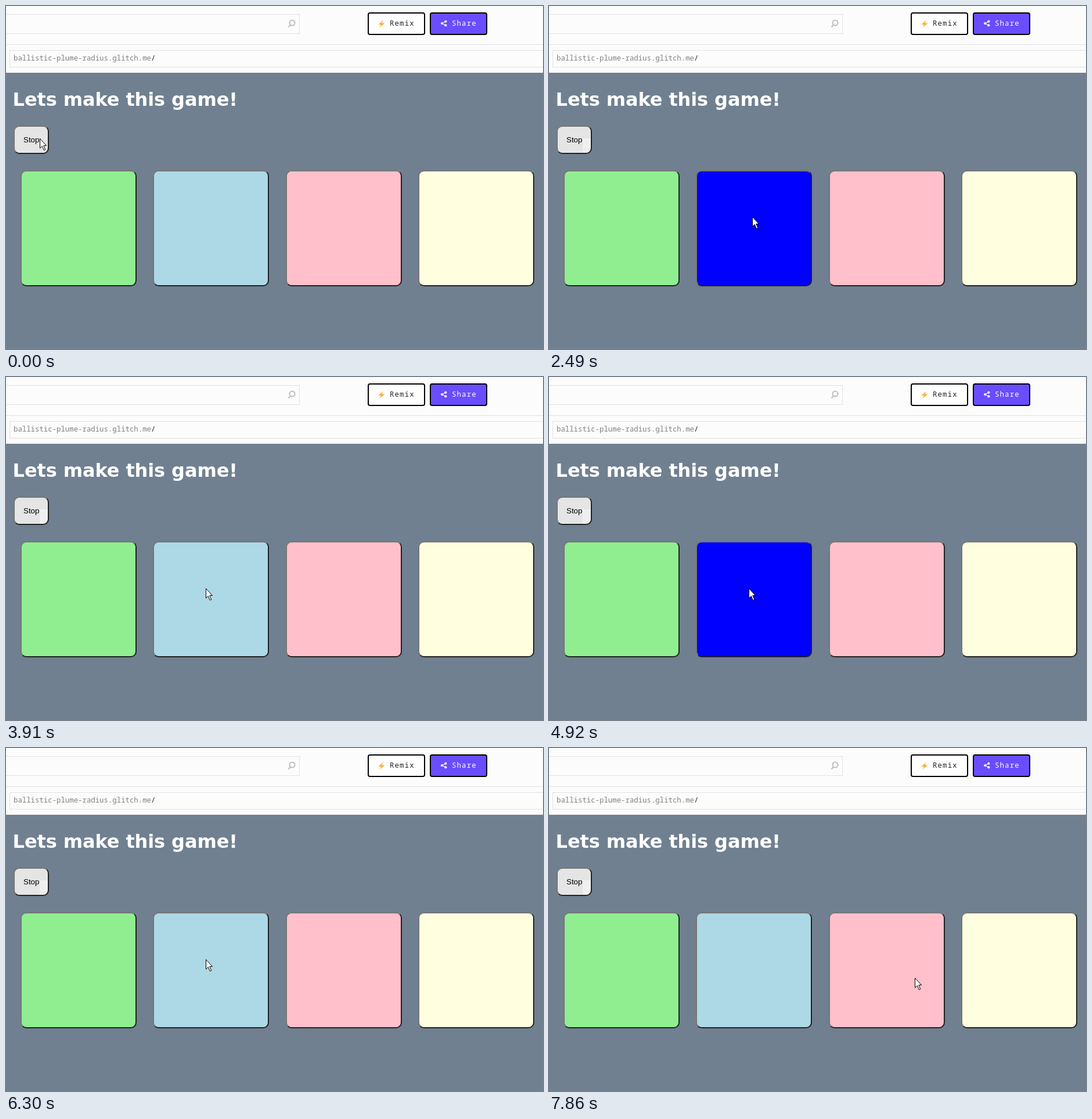
Write an HTML page that moves like this. It is 925 by 591 pixels and loops after 8000 ms.

```html
<!DOCTYPE html>
<html lang="en">
<head>
<meta charset="utf-8">
<title>Memory game</title>
<style>
  html, body { margin: 0; width: 100%; height: 100%; overflow: hidden; background: #fcfcfc; }
  body { position: relative; }
  body * { position: absolute; box-sizing: border-box; }
  .field { border: 1px solid #e2e2e2; }
  #search { left: -4px; top: 14px; width: 510px; height: 34px; }
  #address { left: 6px; top: 76px; width: 940px; height: 30px; }
  #rule { left: 0; top: 66px; width: 100%; height: 1px; background: #e0e0e0; }
  .tool { top: 11px; width: 99px; height: 39px; border: 2px solid #000; border-radius: 4px; }
  #remix { left: 623px; background: #fff; }
  #share { left: 730px; background: #694dff; }
  #game { left: 0; top: 115px; width: 100%; bottom: 0; background: #708090; }
  .key { border: 2px solid; border-color: #767676 #212121 #212121 #767676; border-radius: 10px; }
  .key.pressed { border-color: #212121 #767676 #767676 #212121; }
  #stop { left: 13px; top: 206px; width: 61px; height: 49px; background: #e5e5e5; }
  #stop.left { background: linear-gradient(#efefef, #efefef) 43px 20px / 14px 25px no-repeat #e5e5e5; }
  .card { top: 283px; width: 200px; height: 200px; }
  svg { left: 0; top: 0; width: 925px; height: 591px; }
  .mono { font: 12.35px "Noto Sans Mono", "DejaVu Sans Mono", monospace; }
  .label { letter-spacing: 1.15px; font-weight: 500; }
</style>
</head>
<body>
<div id="search" class="field"></div>
<div id="rule"></div>
<div id="address" class="field"></div>
<div id="remix" class="tool"></div>
<div id="share" class="tool"></div>
<div id="game"></div>
<div id="stop" class="key"></div>
<svg viewBox="0 0 925 591">
  <g fill="none" stroke="#bdbdbd" stroke-width="2">
    <circle cx="493" cy="29" r="4.5"/>
    <path d="M490 32.5 486.5 36.5"/>
  </g>
  <path d="M649.5 24.5 641.5 32H646L643.5 37 652.5 29.5H647.5Z" fill="#ffac33"/>
  <g fill="#fff" stroke="#fff">
    <path d="M757.3 26.7 751 30 757.3 33.3" fill="none" stroke-width="1.2"/>
    <g stroke="none">
      <circle cx="751" cy="30" r="2.1"/>
      <circle cx="757.3" cy="26.7" r="2.1"/>
      <circle cx="757.3" cy="33.3" r="2.1"/>
    </g>
  </g>
  <text class="mono label" x="661" y="34" fill="#222">Remix</text>
  <text class="mono label" x="768" y="34" fill="#fff">Share</text>
  <text class="mono" x="13" y="94" fill="#808080">ballistic-plume-radius.glitch.me<tspan fill="#222">/</tspan></text>
  <text x="11.6" y="172" fill="#fff" style="font:bold 32px 'DejaVu Sans',sans-serif;letter-spacing:-.1px">Lets make this game!</text>
  <text x="30" y="235" style="font:13.333px 'Liberation Sans',Arial,sans-serif">Stop</text>
</svg>
<svg id="overlay" viewBox="0 0 925 591">
  <path id="cursor" fill="#fff" stroke="#000" d="M.5.5V17L4.3 13.4 7.3 20.5 9.8 19.5 6.8 12.5H11.5Z"/>
</svg>
<script>
const LOOP = 8000;
const CARDS = [
  { x: 25, dim: 'lightgreen', lit: 'green' },
  { x: 253, dim: 'lightblue', lit: 'blue' },
  { x: 482, dim: 'pink', lit: 'red' },
  { x: 710, dim: 'lightyellow', lit: 'yellow' },
];
// Lit spans: start, end, card index, pressed by the mouse
const LIT = [
  [390, 1040, 1], [2490, 3080, 1], [3350, 3910, 1], [4340, 4490, 1, true],
  [4920, 5480, 1], [5730, 6300, 1], [6570, 7100, 3], [7710, 7860, 1, true],
];
// Cursor stops: time, x, y
const MOVES = [
  [0, 58, 228], [120, 192, 283], [240, 327, 338], [390, 337, 349], [510, 343, 356],
  [630, 347, 361], [750, 350, 363], [2760, 344, 364], [7860, 630, 396],
];

const byId = id => document.getElementById(id);
const stop = byId('stop'), cursor = byId('cursor');
for (const card of CARDS) {
  card.el = document.createElement('div');
  card.el.className = 'key card';
  card.el.style.left = card.x + 'px';
  document.body.insertBefore(card.el, byId('overlay'));
}

function draw(now) {
  const t = now % LOOP;
  const span = LIT.find(([start, end]) => t >= start && t < end);
  CARDS.forEach(({ el, dim, lit }, i) => {
    const on = span && span[2] === i;
    el.style.backgroundColor = on ? lit : dim;
    el.classList.toggle('pressed', Boolean(on && span[3]));
  });
  const [, x, y] = MOVES.filter(([start]) => start <= t).pop();
  cursor.setAttribute('transform', `translate(${x} ${y})`);
  stop.classList.toggle('left', t >= 120);
  requestAnimationFrame(draw);
}
draw(performance.now());
</script>
</body>
</html>
```
